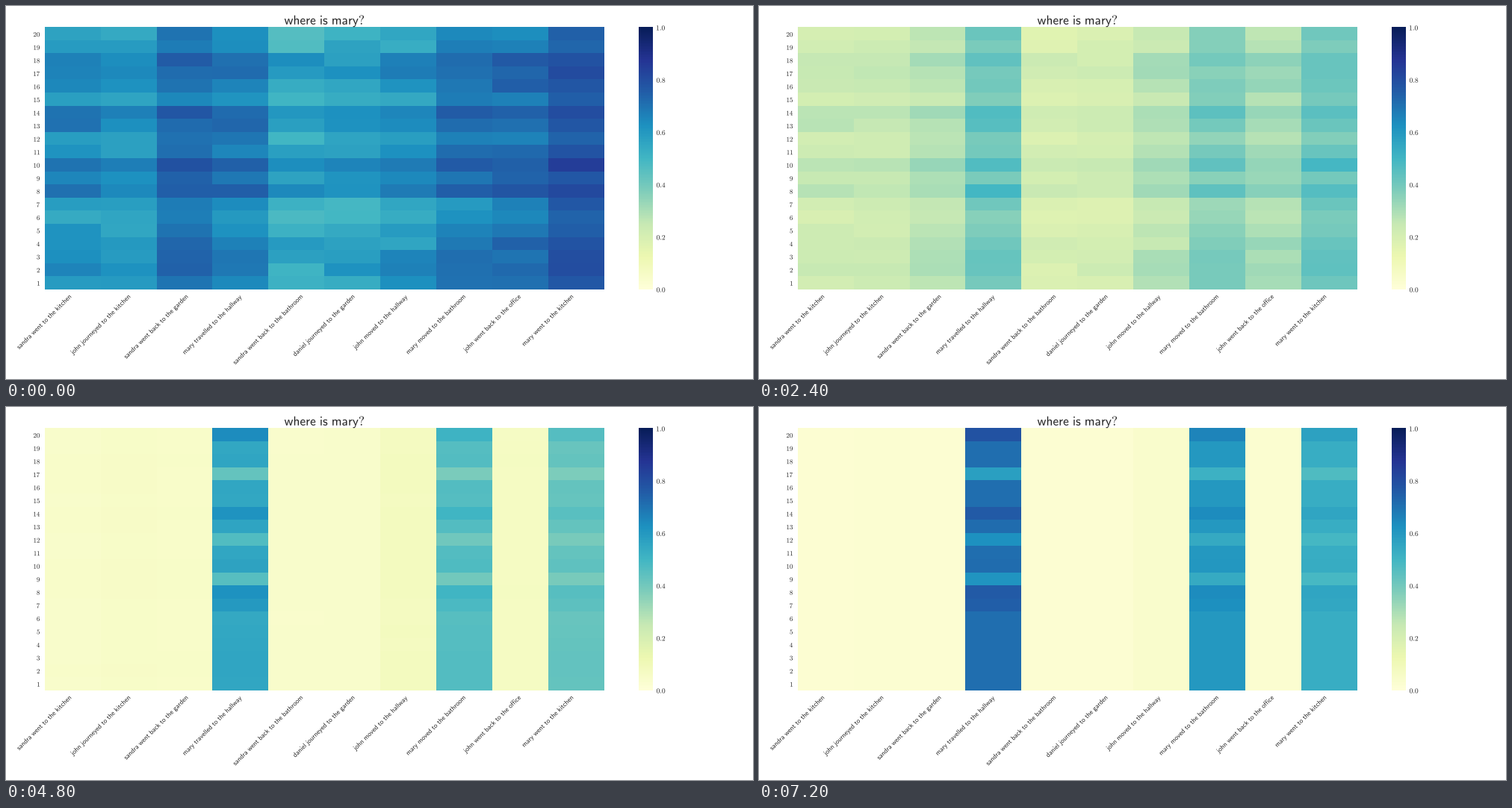
Recreate the animation shown at these times as a matplotlib script. Size 1000 by 500 pixels, loop 8000 ms.

```python
import numpy as np
import matplotlib.pyplot as plt
from matplotlib.animation import FuncAnimation
from matplotlib.patches import PathPatch
from matplotlib.textpath import TextPath
from matplotlib.transforms import Affine2D

W, H, DPI = 1000, 500, 100
STEPS, STEP_MS = 10, 800
HOPS = 20
INK = "#262626"
LEFT, RIGHT, TOP, BOTTOM = 51.5, 800.4, 29.4, 380.5

plt.rcParams["font.family"] = "DejaVu Sans"
plt.rcParams["mathtext.fontset"] = "cm"

# Sentence, attention at the start and end, spread over hops once trained
STORY = [
    ("sandra went to the kitchen", .63, .02, 0),
    ("john journeyed to the kitchen", .60, .025, 0),
    ("sandra went back to the garden", .71, .02, 0),
    ("mary travelled to the hallway", .665, .71, 1),
    ("sandra went back to the bathroom", .55, .02, 0),
    ("daniel journeyed to the garden", .565, .02, 0),
    ("john moved to the hallway", .62, .04, 0),
    ("mary moved to the bathroom", .69, .60, .6),
    ("john went back to the office", .71, .03, 0),
    ("mary went to the kitchen", .78, .53, .4),
]
SENTENCES, START, END, SPREAD = (np.array(part) for part in zip(*STORY))

# Log-odds shifts per hop, from hop 20 down to hop 1
UNTRAINED = .044 * np.array([-5, -4.5, 4.5, 3.5, 0, -4.5, 5, 3, -2.5, 0,
                             7, 2, 4.5, -4.5, -6.5, -3, 0, .5, 2, -1.5])
TRAINED = np.zeros(HOPS)
for hop, shift in {20: .4, 17: -.6, 14: .25, 12: -.4,
                   9: -.45, 8: .25, 7: .2}.items():
    TRAINED[HOPS - hop] = shift
GRAIN = np.random.default_rng(4).normal(0, .09, (HOPS, len(STORY)))


def logit(p):
    return np.log(p / (1 - p))


def progress(t):
    return t**2 / (t**2 + 20)


def attention(step):
    """Attention grid: irrelevant sentences fade, useful ones dip and recover."""
    done = progress(step) / progress(STEPS - 1)
    dip = 1.25 * np.sin(np.pi * (step / (STEPS - 1)) ** .8) ** 2.5
    level = logit(START) + (logit(END) - logit(START)) * done
    level = level - dip * (SPREAD > 0)
    early = 1 / (1 + (step / 3.5) ** 4)
    odds = (level + early * (UNTRAINED[:, None] + GRAIN)
            + (1 - early) * np.outer(TRAINED, SPREAD))
    return 1 / (1 + np.exp(-odds))


fig = plt.figure(figsize=(W / DPI, H / DPI), dpi=DPI, facecolor="white")
ax = fig.add_axes([0, 0, 1, 1])


def label(x, y, text, px, face="mathsf", anchor=(.5, .5), angle=0):
    """Draw text so that the anchor point of its box lies at x, y."""
    body = text.replace(" ", r"\ ")
    path = TextPath((0, 0), rf"$\{face}{{{body}}}$", size=px)
    path = path.transformed(Affine2D().rotate_deg(angle).scale(1, -1))
    box = path.get_extents()
    move = Affine2D().translate(x - box.x0 - anchor[0] * box.width,
                                y - box.y0 - anchor[1] * box.height)
    ax.add_patch(PathPatch(path.transformed(move), color=INK, lw=0))


def heat(values, extent):
    return ax.imshow(values, extent=extent, cmap="YlGnBu", vmin=0, vmax=1,
                     aspect="auto", interpolation="nearest")


mesh = heat(attention(0), (LEFT, RIGHT, BOTTOM, TOP))
heat(np.linspace(1, 0, 256)[:, None], (847, 865.4, BOTTOM, TOP))

label((LEFT + RIGHT) / 2, 20.3, "where is mary?", 17.4)
row_height = (BOTTOM - TOP) / HOPS
for hop in range(1, HOPS + 1):
    label(45, BOTTOM - (hop - .5) * row_height, str(hop), 8.9,
          anchor=(1, .5))
col_width = (RIGHT - LEFT) / len(STORY)
for i, sentence in enumerate(SENTENCES):
    label(LEFT + i * col_width, 388, sentence, 9, anchor=(.5, 0), angle=45)
for tick in np.linspace(0, 1, 6):
    label(871, BOTTOM + (TOP - BOTTOM) * tick, f"{tick:.1f}", 9.4,
          face="mathrm", anchor=(0, .5))

ax.set_xlim(0, W)
ax.set_ylim(H, 0)
ax.axis("off")


def update(step):
    mesh.set_data(attention(step))
    return [mesh]


anim = FuncAnimation(fig, update, frames=STEPS, interval=STEP_MS,
                     repeat=True, repeat_delay=0, blit=False)
plt.show()
```
